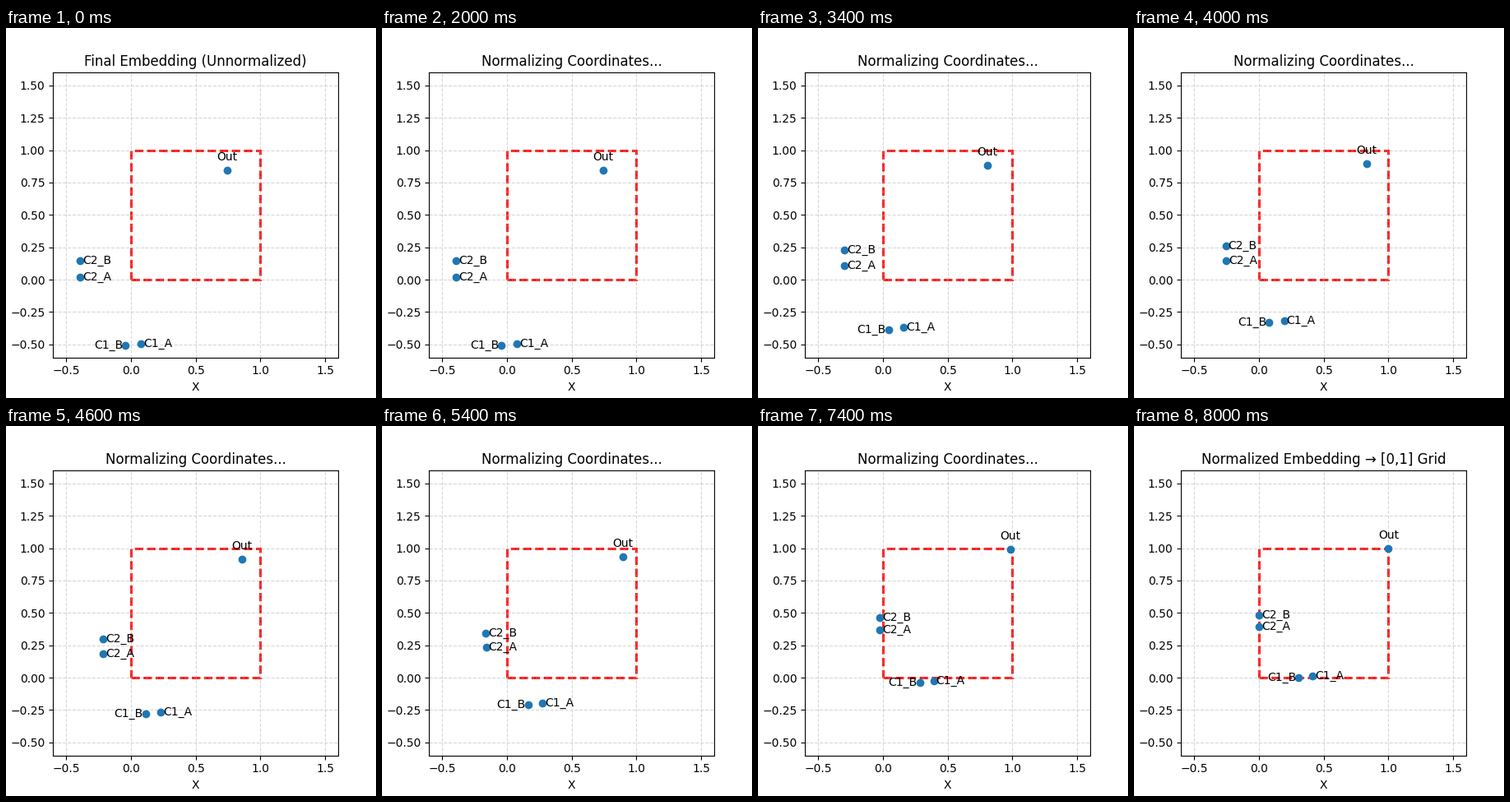
These frames come from a looping animation (450 by 450 pixels, 10 s). A matplotlib script:

```python
import numpy as np
import matplotlib.pyplot as plt
from matplotlib.animation import FuncAnimation
from matplotlib.patches import Rectangle

HOLD, MOVE = 10, 30
INTERVAL = 200

# name, x, y, label offset, label alignment
POINTS = [
    ("C1_A", 0.079, -0.493, (0.02, 0), "left"),
    ("C1_B", -0.042, -0.508, (-0.02, 0), "right"),
    ("C2_A", -0.3898, 0.021, (0.02, 0), "left"),
    ("C2_B", -0.391, 0.146, (0.02, 0), "left"),
    ("Out", 0.743, 0.844, (0, 0.1), "center"),
]

start = np.array([p[1:3] for p in POINTS])
low, high = start.min(axis=0), start.max(axis=0)
end = (start - low) / (high - low)
offsets = np.array([p[3] for p in POINTS])

plt.rcParams["font.family"] = "DejaVu Sans"
fig, ax = plt.subplots(figsize=(4.5, 4.5), dpi=100)
ax.set_xlim(-0.6, 1.6)
ax.set_ylim(-0.6, 1.6)
ax.set_aspect("equal")
ax.set_xticks(np.arange(-0.5, 1.6, 0.5))
ax.set_yticks(np.arange(-0.5, 1.6, 0.25))
ax.set_xlabel("X")
ax.grid(True, linestyle="--", alpha=0.5)
ax.add_patch(Rectangle((0, 0), 1, 1, fill=False, edgecolor="red",
                       linestyle="--", linewidth=2))

dots, = ax.plot(start[:, 0], start[:, 1], "o", color="tab:blue")
labels = [ax.text(0, 0, name, ha=align, va="center", fontsize=10)
          for name, _, _, _, align in POINTS]
title = ax.set_title("")


def title_at(step):
    if step < 0:
        return "Final Embedding (Unnormalized)"
    if step < MOVE:
        return "Normalizing Coordinates..."
    return "Normalized Embedding → [0,1] Grid"


def update(frame):
    step = frame - HOLD
    t = np.clip(step / (MOVE - 1), 0, 1)
    pos = (1 - t) * start + t * end
    dots.set_data(pos[:, 0], pos[:, 1])
    for label, xy in zip(labels, pos + offsets):
        label.set_position(xy)
    title.set_text(title_at(step))
    return [dots, title, *labels]


anim = FuncAnimation(fig, update, frames=HOLD + MOVE + HOLD,
                     init_func=lambda: update(0), interval=INTERVAL,
                     repeat=True, repeat_delay=0, blit=False)
plt.show()
```
